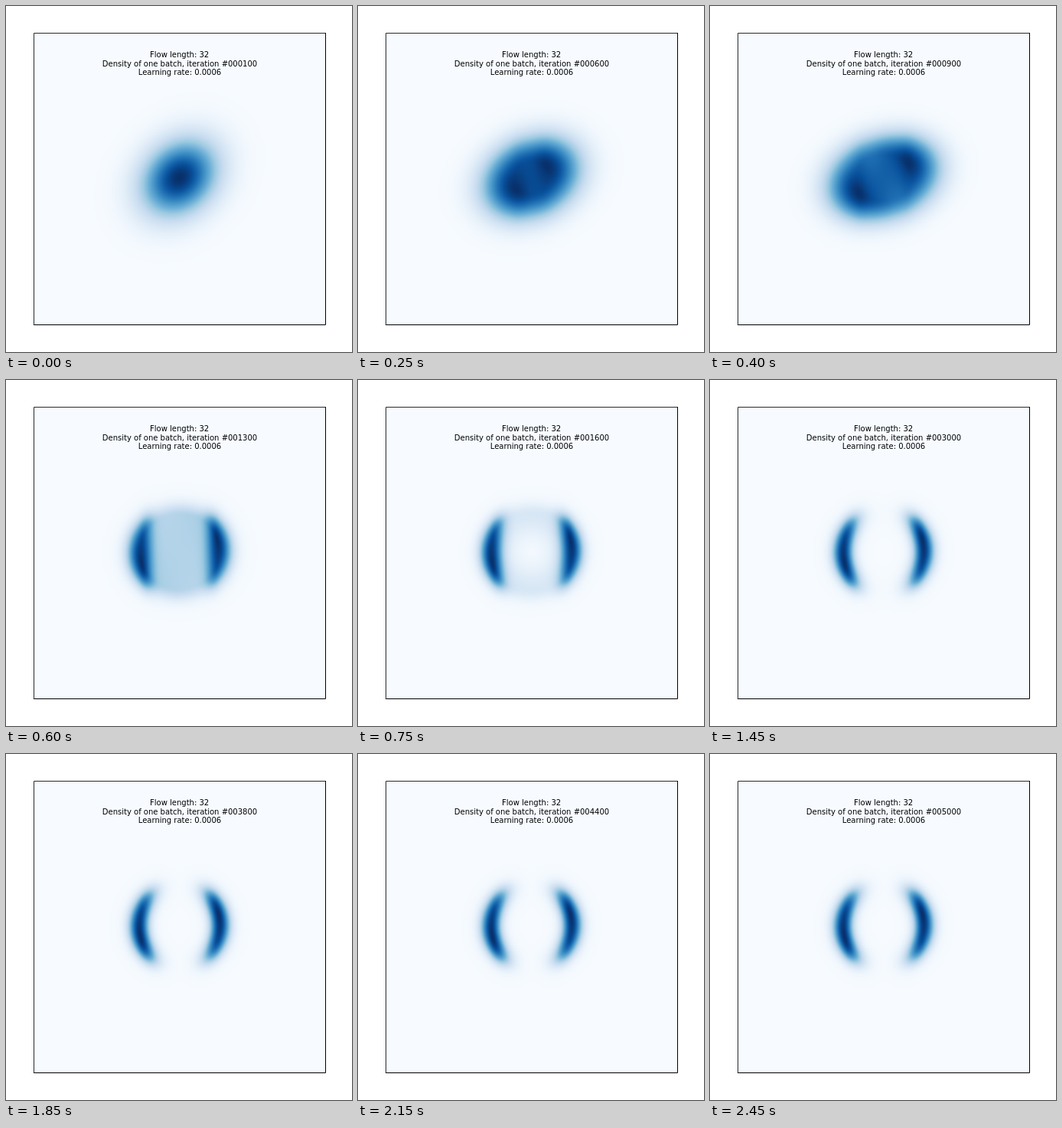
Write an HTML page with a canvas that moves like this. It is 452 px wide and 452 px high and loops after 2500 ms.

```html
<!DOCTYPE html>
<html>
<head>
<meta charset="utf-8">
<style>
  html, body { margin: 0; width: 100%; height: 100%; overflow: hidden; background: #fff; }
  canvas, svg { position: absolute; left: 0; top: 0; width: 452px; height: 452px; }
  path { fill: none; }
  text { font: 10px "DejaVu Sans", sans-serif; text-anchor: middle; }
</style>
</head>
<body>
<canvas id="plot" width="452" height="452"></canvas>
<svg viewBox="0 0 452 452">
  <path d="M36.5 417V35.5H418" stroke="#2a2a2a"/>
  <path d="M417.5 35V416.5H36" stroke="#000"/>
  <text x="226.6" y="67">Flow length: 32</text>
  <text x="227" y="79" id="label"></text>
  <text x="227" y="90">Learning rate: 0.0006</text>
</svg>
<script>
const LOOP = 2500, STEP = 50;
const CENTRE = { x: 226.7, y: 224.3 };
const BOX = { x: 97, y: 95, size: 260 };
const BLUES = ['f7fbff', 'deebf7', 'c6dbef', '9ecae1', '6baed6', '4292c6', '2171b5', '08519c', '08306b']
  .map(hex => [0, 2, 4].map(i => parseInt(hex.slice(i, i + 2), 16)));

const ctx = document.getElementById('plot').getContext('2d');
const label = document.getElementById('label');
const image = ctx.createImageData(BOX.size, BOX.size);
const field = new Float32Array(BOX.size * BOX.size);

const clamp = v => Math.max(0, Math.min(1, v));
const smooth = v => v * v * (3 - 2 * v);
const decay = (t, start, tau) => Math.exp(-Math.max(0, t - start) / tau);

// A round blob spreads sideways, splits in two, then the halves curl onto a ring.
function shapeAt(t) {
  const spread = clamp(t / 400);
  const split = smooth(clamp((t - 400) / 250));
  const curl = 1 - decay(t, 600, 500);
  return {
    radius: 35 * spread + 17.5 * split,
    edge: 33 - 6 * spread - 17 * split - curl,
    hollow: 0.9 * Math.sqrt(curl),
    squash: 1 + 0.27 * spread - 0.22 * split,
    bridge: (1 - 0.1 * spread) * decay(t, 400, 180),
    lobe: 10 + 4.5 * curl,
    skew: 2e-4 - 1.5e-4 * split,
    halo: 0.08 * split
  };
}

function density(x, y, s) {
  let ring = (Math.hypot(x, y * s.squash) - s.radius) / s.edge;
  if (ring < 0) ring *= s.hollow;
  const inner = Math.max(0, s.radius - Math.abs(x)) / s.lobe;
  const sides = s.bridge + (1 - s.bridge) * Math.exp(-inner * inner / 2);
  const p = sides * Math.exp(-ring * ring / 2 - s.skew * x * y);
  return p + s.halo * Math.pow(p, 0.3);
}

function drawDensity(t) {
  const s = shapeAt(t), size = BOX.size;
  let max = 0;
  for (let n = 0; n < field.length; n++) {
    const x = BOX.x + n % size + 0.5, y = BOX.y + Math.floor(n / size) + 0.5;
    field[n] = density(x - CENTRE.x, y - CENTRE.y, s);
    max = Math.max(max, field[n]);
  }
  for (let n = 0; n < field.length; n++) {
    const level = field[n] / max * 8, k = Math.min(7, Math.floor(level));
    for (let c = 0; c < 3; c++) {
      image.data[n * 4 + c] = BLUES[k][c] + (BLUES[k + 1][c] - BLUES[k][c]) * (level - k);
    }
    image.data[n * 4 + 3] = 255;
  }
  ctx.putImageData(image, BOX.x, BOX.y);
}

let shown = -1;
function render(now) {
  const step = Math.floor(now % LOOP / STEP);
  if (step === shown) return;
  shown = step;
  drawDensity(step * STEP);
  label.textContent = 'Density of one batch, iteration #' + String((step + 1) * 100).padStart(6, '0');
}

ctx.fillStyle = '#f7fbff';
ctx.fillRect(36, 35, 382, 382);
const start = performance.now();
function tick() {
  render(performance.now() - start);
  requestAnimationFrame(tick);
}
tick();
</script>
</body>
</html>
```
